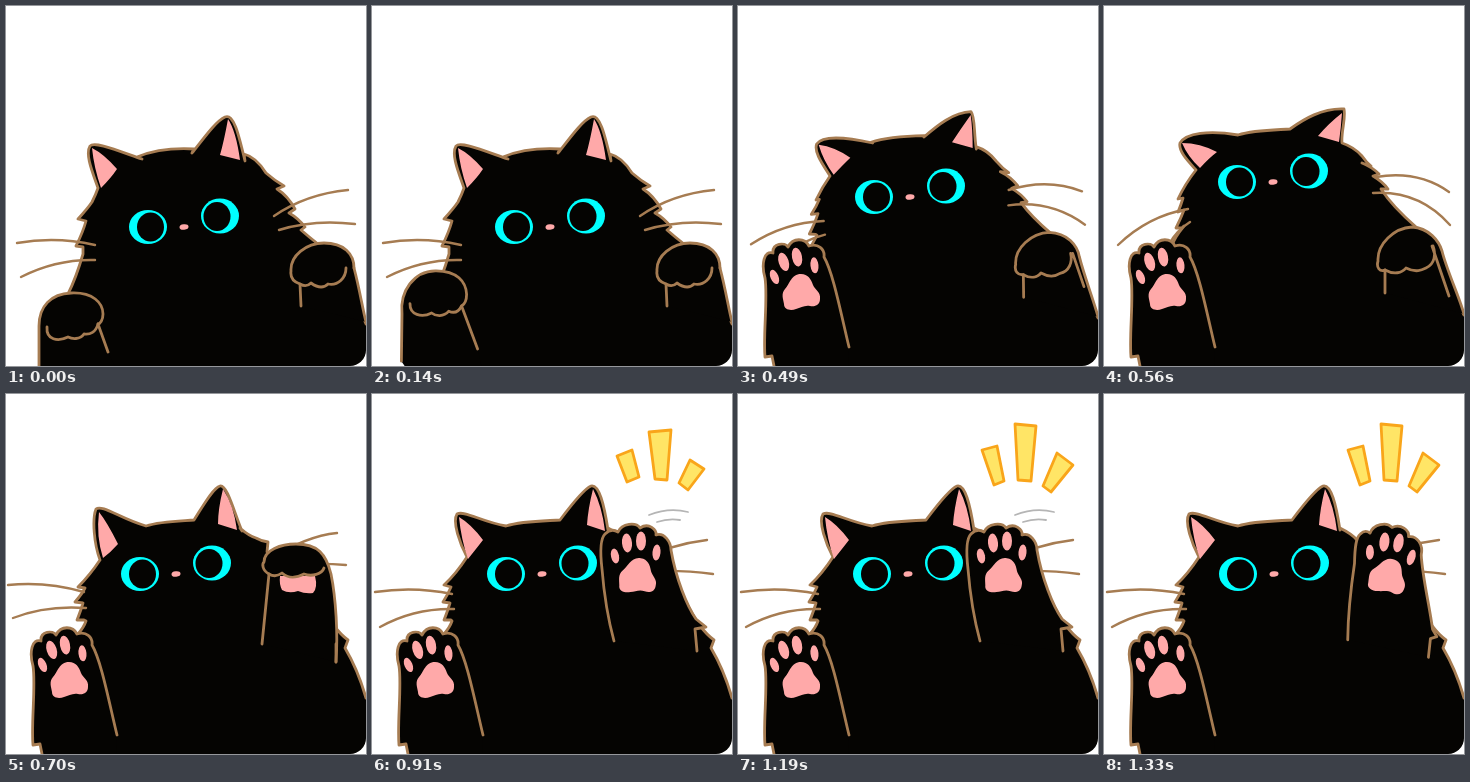
Animation of 360x360 px, one loop 1.4 s. Source, as an HTML page with a canvas:

```html
<!DOCTYPE html>
<html lang="en">
<head>
<meta charset="utf-8">
<title>Waving cat</title>
<style>
  html, body { margin: 0; width: 100%; height: 100%; overflow: hidden; background: #fff; }
  canvas { display: block; width: 360px; height: 360px; }
</style>
</head>
<body>
<canvas id="stage" width="360" height="360"></canvas>
<script>
const ctx = document.getElementById('stage').getContext('2d');
const STEP = 70, STEPS = 20;
const FUR = '#050402', LINE = '#a67c52', PINK = '#ffa9a9', CYAN = '#00ffff';

// Every pose uses the same path commands, so poses can be blended number by number.
const rest = {
  body: 'M62 288 Q70 272 77 248 L77 241 L70 240 Q77 226 80 215 L72 213 Q82 202 86 196 L86 196 Q90 188 92 182 ' +
    'C86 165 79 148 84 140 C88 135 110 144 136 153 L131 151 C148 144 170 142 188 143 L186 147 ' +
    'C198 132 210 115 219 111 C228 107 233 130 239 155 L238 148 Q250 151 260 167 Q268 174 278 180 ' +
    'L271 183 Q282 190 289 203 L283 207 Q292 212 299 221 L295 224 Q303 231 312 238 L318 250 Q340 270 360 318',
  ears: 'M86 142 Q98 148 111 163 Q105 172 95 182 Q88 162 86 142Z M222 113 Q218 135 214 149 L234 154 Q230 125 222 113Z',
  whiskers: 'M11 237 Q50 230 89 239 M15 271 Q50 253 89 254 M268 210 Q300 188 342 184 M273 224 Q308 213 349 218',
  nose: '178 221',
  arm: 'M295 300 L294 278 C288 276 284 272 285 265 C284 250 300 237 318 237 C338 237 348 248 348 262 C354 285 356 300 360 316',
  curl: 'M294 278 C299 281 302 280 305 277 C312 282 318 282 322 278 C332 280 340 272 340 262 M348 262 L348 262'
};
const crouch = {
  body: 'M68 240 Q70 232 80 220 L78 222 L72 222 Q77 212 80 204 L74 206 Q77 199 79 192 L74 193 Q81 178 92 164 ' +
    'C84 155 74 145 76 137 C82 127 105 124 134 129 L134 129 C150 124 170 124 186 123 L186 123 ' +
    'C200 113 218 102 240 103 C242 113 237 125 238 137 L238 137 Q250 141 258 150 Q262 156 267 160 ' +
    'L258 157 Q268 161 275 168 L269 170 Q279 176 284 183 L277 183 Q288 200 312 221 L318 230 Q336 262 360 309',
  ears: 'M78 137 Q96 137 113 146 Q105 152 96 162 Q84 151 78 137Z M238 107 Q225 117 214 130 L235 136 Q237 122 238 107Z',
  whiskers: 'M14 239 Q44 210 84 203 M66 237 Q72 225 86 216 M272 171 Q314 164 345 186 M269 187 Q315 184 346 219',
  nose: '169 176',
  arm: 'M281 287 L281 264 C276 266 272 262 274 255 C273 238 290 222 308 221 C325 222 335 235 338 245 C343 265 355 290 360 308',
  curl: 'M281 264 C290 269 298 267 302 262 C312 267 318 264 322 262 C331 258 332 248 329 240 M328 240 L345 290'
};
const stretch = {
  body: 'M72 240 Q78 233 80 227 L78 226 L71 226 Q75 216 77 209 L69 208 Q76 200 79 194 L72 193 Q84 181 94 166 ' +
    'C88 150 86 125 90 115 C96 110 115 125 140 132 L140 132 C155 127 175 127 188 126 L188 126 ' +
    'C197 112 207 94 214 92 C221 90 228 118 236 137 L234 134 Q243 142 250 144 Q255 147 262 148 ' +
    'L261 158 Q270 165 275 170 L280 175 Q300 190 310 200 L315 210 Q328 236 342 246 L339 254 Q352 276 360 304',
  ears: 'M93 118 Q101 128 112 150 Q105 158 97 164 Q90 142 93 118Z M217 95 Q212 115 212 130 L231 136 Q228 112 217 95Z',
  whiskers: 'M2 191 Q40 187 78 198 M7 224 Q40 211 80 214 M262 166 Q300 142 331 139 M265 173 Q305 168 340 171',
  nose: '170 180',
  arm: 'M256 250 L263 180 C256 176 256 170 258 168 C258 156 275 150 290 150 C312 150 320 160 325 180 C330 205 332 240 330 268',
  curl: 'M263 180 C268 183 272 182 276 179 C284 186 292 183 298 180 C306 183 316 180 318 174 M330 250 L330 268'
};
const wave = {
  ...stretch,
  body: 'M72 240 Q78 233 80 227 L79 226 L72 226 Q76 216 78 209 L71 208 Q76 200 79 193 L72 191 Q84 180 95 163 ' +
    'C88 150 80 128 85 120 C92 116 110 128 134 132 L134 132 C150 127 172 127 188 126 L188 126 ' +
    'C200 110 212 95 219 92 C227 90 232 110 236 136 L236 134 Q248 140 253 146 Q259 151 265 150 ' +
    'L262 158 Q270 165 275 170 L280 175 Q300 190 310 200 L315 210 Q328 236 342 246 L339 254 Q352 276 360 304',
  ears: 'M87 123 Q99 130 111 146 Q104 155 96 165 Q89 145 87 123Z M221 95 Q216 115 215 131 L233 137 Q230 112 221 95Z',
  whiskers: 'M3 198 Q42 192 80 200 M8 233 Q42 214 82 215 M262 168 Q300 150 335 146 M265 178 Q305 175 341 180'
};
const POSES = [[0, rest], [5, rest], [8, crouch], [10, stretch], [13, wave], [20, wave]];

const leftRest = {
  arm: 'M33 360 L33 320 C33 300 45 288 65 287 C87 286 97 297 97 308 C97 314 94 318 92 318 L102 346',
  curl: 'M92 318 C90 326 84 329 78 328 C74 334 66 333 62 331 C52 336 40 334 41 321'
};
const leftRaised = {
  arm: 'M27 352 L28 300 C24 275 40 250 62 250 C84 250 92 262 93 275 C93 282 90 286 88 288 L108 341',
  curl: 'M88 288 C84 293 80 293 76 290 C70 296 62 295 58 291 C48 296 36 292 36 282'
};
const LEFT_OPEN = 'M36 360 L34 350 L27 351 C25 330 30 290 27 272 C23 258 26 244 35 247 C34 237 47 236 50 241 ' +
  'C55 231 67 232 71 240 C80 237 87 243 86 251 C95 266 103 308 111 341';
const WAVE_LEFT = 'M242 247 C236 225 232 200 230 175 C228 158 228 145 233 140 C238 135 243 136 246 138 ' +
  'C250 129 264 128 268 134 C277 128 285 136 284 141 C292 138 299 148 299 156 C304 185 315 212 324 225 L334 233 L323 235 L325 257';
const WAVE_RIGHT = 'M245 245 C250 225 258 190 266 165 C268 150 270 142 274 140 C277 137 279 138 281 140 ' +
  'C284 131 297 127 303 133 C312 130 321 137 320 144 C329 144 335 153 331 165 C329 180 334 215 332 243 L332 250 L329 252 L324 268';
const LEFT_FLOOR = ' L110 362 L34 362Z';

const PAD = 'M0 -18 C7 -18 10 -13 12 -7 C14 -2 20 0 19 7 C19 13 14 15 9 14 C3 13 0 16 -5 17 ' +
  'C-10 19 -17 18 -17 12 C-18 6 -20 2 -16 -3 C-11 -8 -10 -18 0 -18Z';
const TOES = [[-23, -20, 4, 7.5, -.2], [-11, -33, 5, 9.5, -.1], [3, -35, 5, 9.5, 0], [18.5, -23.5, 4, 8, .1]];
const HIDDEN_PAD = 'M274 182 L309 182 Q312 194 307 199 Q299 200 292 197 Q283 200 276 196 Q273 190 274 182Z';

const SPARK_TALL = 'M245 62 L260 56 L267 83 L255 88Z M277 38 L299 36 L295 86 L283 85Z M318 66 L332 75 L316 96 L307 89Z';
const SPARK_WIDE = 'M235 36 L256 29 L266 83 L253 88Z M281 68 L296 68 L294 88 L284 88Z M328 44 L345 56 L318 95 L307 89Z';
const SPARK_LAST = 'M244 56 L259 52 L266 87 L256 91Z M277 30 L298 32 L293 87 L280 86Z M319 59 L335 71 L313 98 L305 92Z';
const SWISH_LEFT = 'M277 121 Q297 113 316 118 M285 128 Q297 124 308 126';
const SWISH_RIGHT = 'M254 120 Q271 116 288 118 M268 128 Q276 125 284 126';

// Sideways swing of the open paw, 0 = left, 1 = right, starting at step 11.
const SWING = [.6, .25, 0, .5, 1, .5, 0, .3, .57];

const NUMBER = /-?[\d.]+/g;
function mix(a, b, t) {
  const to = b.match(NUMBER);
  let i = 0;
  return a.replace(NUMBER, n => +n + (to[i++] - n) * t);
}
function mixPose(a, b, t) {
  return Object.fromEntries(Object.keys(a).map(key => [key, mix(a[key], b[key], t)]));
}
function poseAt(step) {
  const i = POSES.findIndex(([at], k) => step >= at && step < POSES[k + 1][0]);
  const [from, a] = POSES[i], [to, b] = POSES[i + 1];
  return mixPose(a, b, (step - from) / (to - from));
}

function fill(path, color) {
  ctx.fillStyle = color;
  ctx.fill(new Path2D(path));
}
function stroke(path, color = LINE, width = 2.8) {
  ctx.strokeStyle = color;
  ctx.lineWidth = width;
  ctx.stroke(new Path2D(path));
}
function limb(path, floor = '') {
  fill(path + floor, FUR);
  stroke(path);
}
function oval(x, y, rx, ry, color, angle = 0) {
  ctx.fillStyle = color;
  ctx.beginPath();
  ctx.ellipse(x, y, rx, ry, angle, 0, Math.PI * 2);
  ctx.fill();
}

function drawHead(pose) {
  limb(pose.body, ' L362 362 L40 362Z');
  fill(pose.ears, PINK);
  stroke(pose.whiskers, LINE, 2.4);
  const [x, y] = pose.nose.split(' ').map(Number);
  oval(x - 36, y, 19, 17, CYAN);
  oval(x - 33.5, y, 13.5, 14.5, FUR);
  oval(x + 36, y - 11, 19, 17.5, CYAN);
  oval(x + 33, y - 10.5, 13.5, 14.5, FUR);
  oval(x, y, 4.5, 2.8, PINK, -.1);
}
function drawCurled({ arm, curl }, padShift, floor) {
  limb(arm, floor);
  if (padShift) {
    ctx.save();
    ctx.translate(...padShift);
    fill(HIDDEN_PAD, PINK);
    ctx.restore();
  }
  stroke(curl);
}
function drawOpen(arm, x, y, angle, floor) {
  limb(arm, floor);
  ctx.save();
  ctx.translate(x, y);
  ctx.rotate(angle);
  for (const [tx, ty, rx, ry, tilt] of TOES) oval(tx, ty, rx, ry, PINK, tilt);
  // The pad turns a little less than the toes.
  ctx.rotate(.16 - angle * .2);
  fill(PAD, PINK);
  ctx.restore();
}
function drawLeftArm(step) {
  if (step > 3) return drawOpen(LEFT_OPEN, 63, 286, -.2, LEFT_FLOOR);
  const t = [0, .2, .6, 1][step];
  drawCurled(mixPose(leftRest, leftRaised, t), step === 3 && [-231, 108], LEFT_FLOOR);
}
function drawRightArm(step, pose) {
  if (step < 11) return drawCurled(pose, step === 10 && [0, 0]);
  const u = SWING[step - 11];
  drawOpen(mix(WAVE_LEFT, WAVE_RIGHT, u), 266 + 32 * u, 182 + u, .37 * u);
}
function sparkAt(step) {
  if (step <= 15) return mix(SPARK_TALL, SPARK_WIDE, Math.max(0, step - 13) / 2);
  return mix(SPARK_WIDE, SPARK_LAST, [.5, 1, 1.18, 1][step - 16]);
}
function drawAccents(step) {
  if (step < 12) return;
  const sparks = sparkAt(step);
  fill(sparks, '#ffe566');
  stroke(sparks, '#f9a51a', 2.8);
  if (step === 13 || step === 17) stroke(SWISH_LEFT, '#b5b5b5', 1.8);
  if (step === 15) stroke(SWISH_RIGHT, '#b5b5b5', 1.8);
}

function draw(now) {
  const step = Math.floor(now / STEP) % STEPS;
  const pose = poseAt(step);
  ctx.fillStyle = '#fff';
  ctx.fillRect(0, 0, 360, 360);
  ctx.save();
  ctx.beginPath();
  ctx.roundRect(0, 0, 360, 360, 16);
  ctx.clip();
  ctx.lineCap = ctx.lineJoin = 'round';
  drawHead(pose);
  drawLeftArm(step);
  drawRightArm(step, pose);
  drawAccents(step);
  ctx.restore();
}

const start = performance.now();
function tick() {
  draw(performance.now() - start);
  requestAnimationFrame(tick);
}
tick();
</script>
</body>
</html>
```
